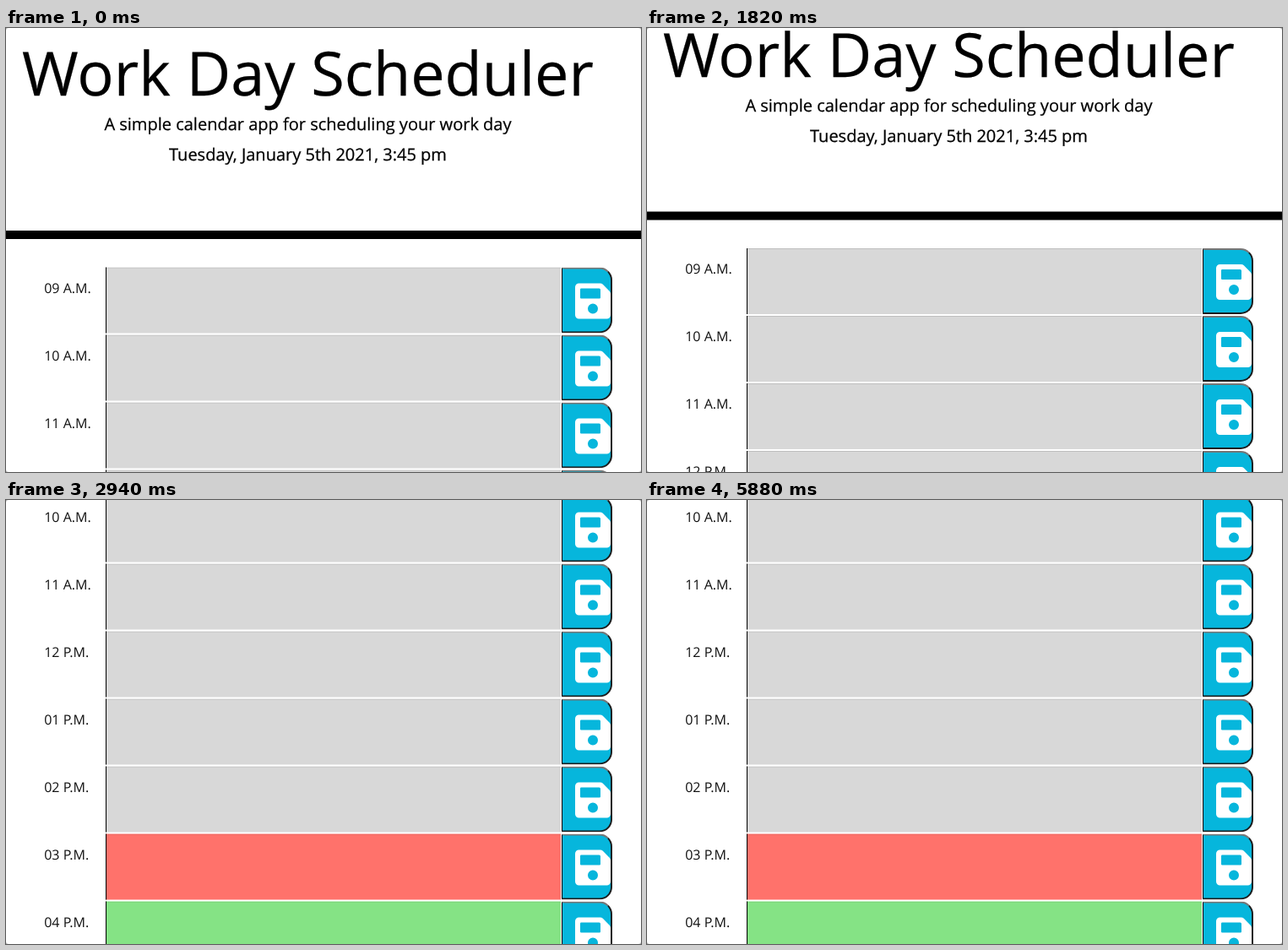
Animation of 752 by 526 pixels, one loop 5.95 s. Source, as an HTML page:

```html
<!DOCTYPE html>
<html lang="en">
<head>
<meta charset="utf-8">
<title>Work Day Scheduler</title>
<style>
  html, body { margin: 0; width: 100%; height: 100%; overflow: hidden; background: #aaa; }
  body { font: 16px/24px "Open Sans", sans-serif; color: #000; text-rendering: geometricPrecision; }
  #stage { position: relative; width: 752px; height: 526px; overflow: hidden; background: #fff; border-radius: 3px; }
  #page, #page * { position: absolute; box-sizing: border-box; white-space: nowrap; margin: 0; }
  #page { left: 0; top: 0; width: 752px; height: 1010px; }
  h1, p { left: 0; width: 715px; text-align: center; -webkit-text-stroke: .25px #000; }
  h1 { top: 10px; font-size: 72px; line-height: 86.4px; font-weight: 400; }
  p { font-size: 20px; line-height: 30px; }
  .bar { top: 240px; width: 752px; height: 10px; background: #000; }
  .row { left: 0; top: 0; width: 752px; height: 78px; }
  .hour { left: 45.2px; top: 11.5px; color: #111; }
  .cell { left: 118px; top: 0; width: 539px; height: 78px; border-left: 1px solid #000; box-shadow: inset 0 1px rgba(0, 0, 0, .12); }
  .past { background: #d8d8d8; }
  .present { background: #ff726b; }
  .future { background: #85e385; }
  .save {
    left: 658px; top: 0; width: 60px; height: 78px; background: #06b6dc;
    border: 2px solid #1c1c1c; border-top-color: #767676; border-left: 1px solid #000;
    border-radius: 0 15px 15px 0;
  }
  #page svg { left: 673.5px; top: 15.5px; width: 42px; height: 48px; fill: #fff; }
</style>
</head>
<body>
<div id="stage">
  <div id="page">
    <h1>Work Day Scheduler</h1>
    <p style="top:98.5px">A simple calendar app for scheduling your work day</p>
    <p style="top:134.5px">Tuesday, January 5th 2021, 3:45 pm</p>
    <div class="bar"></div>
  </div>
</div>
<script>
const LOOP = 5950, STEP = 70;
const CURRENT_HOUR = 15;
const page = document.getElementById('page');

// Floppy disk with a label window and a round hub cut out
const icon = `<svg viewBox="0 0 448 512"><path fill-rule="evenodd" d="
  M48 32H316Q336 32 350 46L434 130Q448 144 448 164V432A48 48 0 0 1 400 480H48A48 48 0 0 1 0 432V80A48 48 0 0 1 48 32Z
  M76 96H304Q320 96 320 112V212Q320 224 308 224H76Q64 224 64 212V108Q64 96 76 96Z
  M160 352a64 64 0 1 0 128 0a64 64 0 1 0 -128 0Z"/></svg>`;

for (let hour = 9; hour <= 17; hour++) {
  const label = String((hour + 11) % 12 + 1).padStart(2, '0') + (hour < 12 ? ' A.M.' : ' P.M.');
  const state = hour < CURRENT_HOUR ? 'past' : hour > CURRENT_HOUR ? 'future' : 'present';
  page.insertAdjacentHTML('beforeend', `<div class="row" style="transform:translateY(${283.5 + (hour - 9) * 80}px)">
    <span class="hour">${label}</span><div class="cell ${state}"></div><div class="save"></div>${icon}</div>`);
}

// [time, scroll offset] at the ends of each swipe
const scrollKeys = [[0, 0], [1190, 0], [1400, 4], [1610, 20], [1820, 22.5],
  [2240, 230], [2590, 230], [2660, 232], [2940, 368], [LOOP, 368]];

function scrollAt(t) {
  const i = scrollKeys.findIndex(key => key[0] > t);
  const [t0, y0] = scrollKeys[i - 1], [t1, y1] = scrollKeys[i];
  const u = (t - t0) / (t1 - t0);
  return y0 + (y1 - y0) * u * u * (3 - 2 * u);
}

const start = performance.now();
function draw() {
  const t = (performance.now() - start) % LOOP;
  const y = Math.round(scrollAt(Math.floor(t / STEP) * STEP) * 2) / 2;
  page.style.transform = `translateY(${-y}px)`;
  requestAnimationFrame(draw);
}
draw();
</script>
</body>
</html>
```
